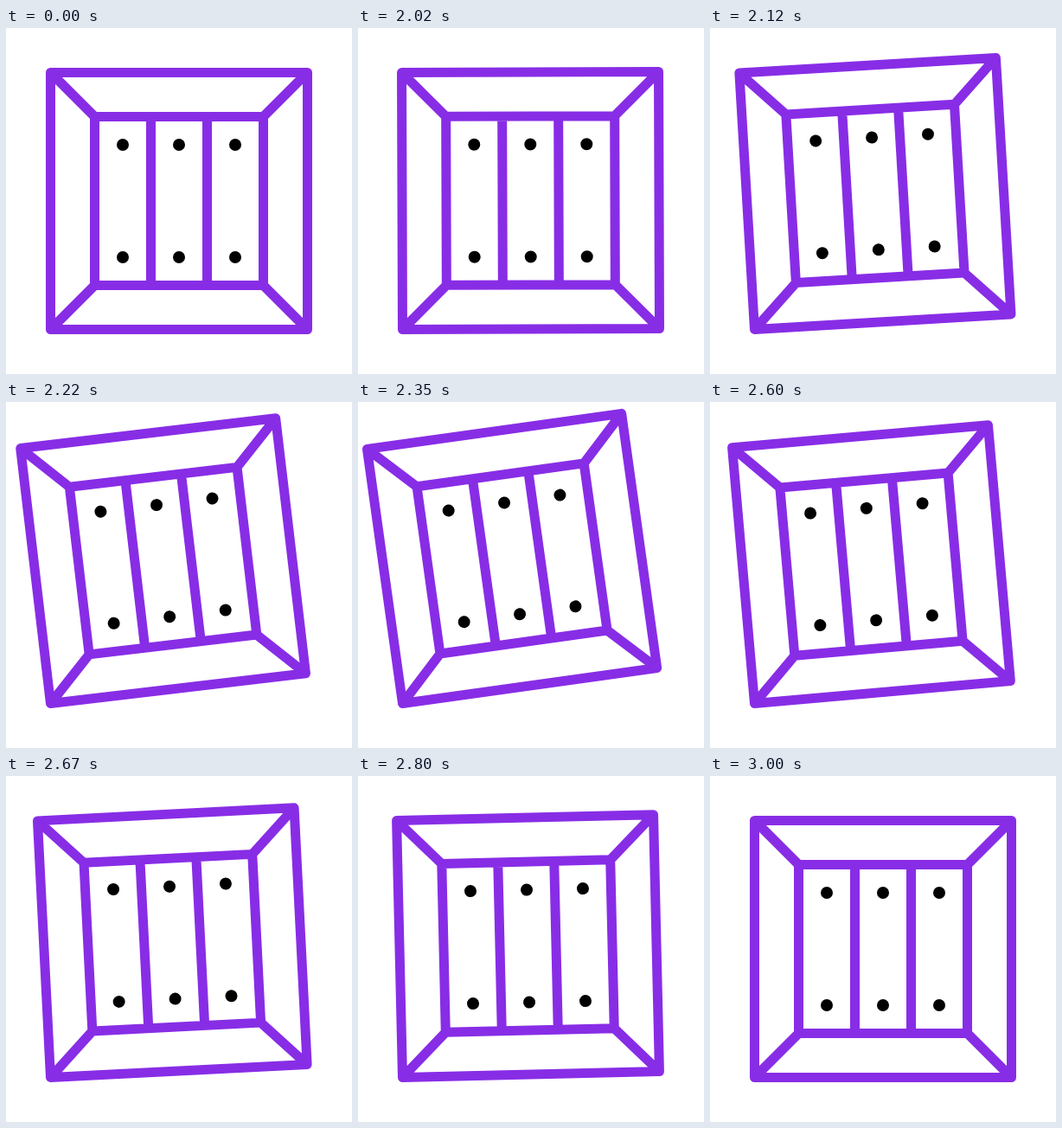
Animation of 400 by 400 pixels, one loop 3020 ms. Source, as an HTML page:

```html
<!DOCTYPE html>
<html lang="en">
<head>
<meta charset="utf-8">
<title>Tilting crate</title>
<style>
  html, body { margin: 0; width: 100%; height: 100%; overflow: hidden; background: #fff; }
  svg { display: block; width: 100vw; height: 100vh; }
</style>
</head>
<body>
<svg viewBox="0 0 400 400">
  <g id="crate">
    <path fill="none" stroke="#882de6" stroke-width="11" stroke-linejoin="round" d="
      M51.5 51.5H348.5V348.5H51.5Z
      M102.5 102.5H297.5V297.5H102.5Z
      M167.5 102.5V297.5M232.5 102.5V297.5
      M51.5 51.5L102.5 102.5M348.5 51.5L297.5 102.5
      M348.5 348.5L297.5 297.5M51.5 348.5L102.5 297.5"/>
    <path stroke="#000" stroke-width="14" stroke-linecap="round" d="
      M135 135h0M200 135h0M265 135h0M135 265h0M200 265h0M265 265h0"/>
  </g>
</svg>
<script>
const LOOP = 3020, REST = 2000, STEP = 25;
const crate = document.getElementById('crate');

// Tilt keys: step, degrees, degrees per step
const keys = [
  [0, 0, 0], [9, 6.72, 0.42], [16.5, 8.05, 0], [21, 7.33, -0.6],
  [27, 2.9, -0.45], [32, 1.33, -0.23], [40, 0, -0.1]
];

function tilt(n) {
  if (n <= 0 || n >= 40) return 0;
  const i = keys.findIndex(k => k[0] > n);
  const [n0, a0, s0] = keys[i - 1], [n1, a1, s1] = keys[i];
  const h = n1 - n0, u = (n - n0) / h, v = 1 - u;
  return a0 * v * v * (1 + 2 * u) + a1 * u * u * (3 - 2 * u)
       + h * u * v * (s0 * v - s1 * u);
}

const start = performance.now();

function draw() {
  const t = (performance.now() - start) % LOOP;
  // Steps are 25 ms long, shown on a 10 ms clock
  const n = Math.floor((Math.floor(t / 10) * 10 + 5 - REST) / STEP);
  crate.setAttribute('transform', `rotate(${-tilt(n)} 51.5 348.5)`);
  requestAnimationFrame(draw);
}
draw();
</script>
</body>
</html>
```
